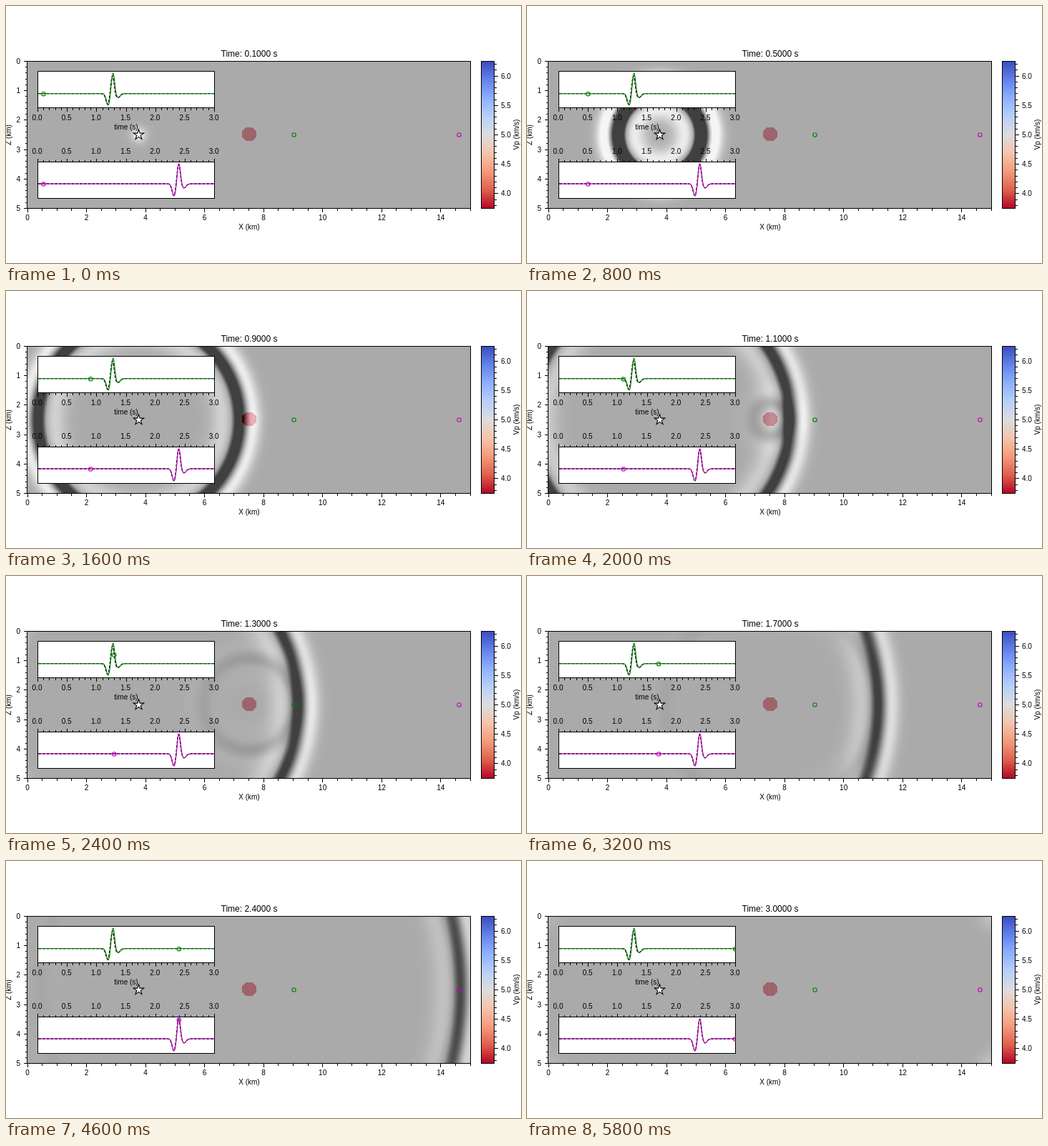
An HTML page with a canvas that plays this animation: 720x360 px, repeating every 6000 ms.

```html
<!DOCTYPE html>
<html lang="en">
<head>
<meta charset="utf-8">
<title>Wave propagation</title>
<style>
  html, body { margin: 0; width: 100%; height: 100%; overflow: hidden; background: #fff; }
  canvas { position: absolute; left: 30px; top: 77px; }
  svg { position: absolute; left: 0; top: 0; }
  text { font: 10px "Liberation Sans", Arial, sans-serif; fill: #000; text-anchor: middle; }
  #title { font-size: 12px; }
  .axis { stroke: #000; stroke-width: 1; fill: none; shape-rendering: crispEdges; }
</style>
</head>
<body>
<canvas id="field" width="620" height="207"></canvas>
<svg id="plot" width="720" height="360" viewBox="0 0 720 360">
  <defs>
    <linearGradient id="velocity" x1="0" y1="0" x2="0" y2="1"></linearGradient>
  </defs>
  <text id="title" x="340" y="71"></text>
</svg>
<script>
const LEFT = 30, TOP = 77, W = 620, H = 207;
const KM = 619 / 15, SPEED = 5 * KM;
const SOURCE = [185.5, 180.5], BLOB = [340, 179.5];
const GREEN = '#008000', MAGENTA = '#bf00bf';
const plot = document.getElementById('plot');
const title = document.getElementById('title');

function add(tag, attrs, text) {
  const el = document.createElementNS('http://www.w3.org/2000/svg', tag);
  for (const k in attrs) el.setAttribute(k, attrs[k]);
  if (text !== undefined) el.textContent = text;
  plot.append(el);
  return el;
}
const label = (x, y, text, more) => add('text', { x, y, ...more }, text);
const vertical = (x, y, text) => label(0, 0, text, { transform: `translate(${x} ${y}) rotate(-90)` });
const box = (x, y, width, height, fill) => add('rect', { x, y, width, height, class: 'axis', style: `fill:${fill}` });
const ring = (cx, cy, color) => add('circle', { cx, cy, r: 2.7, fill: 'none', stroke: color, 'stroke-width': 1.1 });

// count + 1 ticks from (x, y), spaced by (dx, dy), pointing along (ux, uy)
function ticks(x, y, dx, dy, ux, uy, count, isMajor) {
  let d = '';
  for (let i = 0; i <= count; i++) {
    const n = isMajor(i) ? 5 : 3;
    d += `M${Math.round(x + i * dx - .5) + .5} ${Math.round(y + i * dy - .5) + .5}l${ux * n} ${uy * n}`;
  }
  add('path', { d, class: 'axis' });
}

// Main axes
box(29.5, 77.5, 620, 206, 'none');
ticks(30, 283.5, KM / 2, 0, 0, 1, 30, i => i % 4 === 0);
ticks(29.5, 77.5, 0, 206 / 25, -1, 0, 25, i => i % 5 === 0);
for (let x = 0; x <= 14; x += 2) label(30 + x * KM, 300, x);
for (let z = 0; z <= 5; z++) label(20, 81 + z * 41.2, z, { style: 'text-anchor:end' });
label(340, 313, 'X (km)');
vertical(7, 180.5, 'Z (km)');

// Colour bar
const stops = ['59,76,192', '98,130,234', '141,176,254', '184,208,249', '221,221,221',
  '245,196,173', '244,154,123', '222,96,77', '180,4,38'];
document.getElementById('velocity').innerHTML =
  stops.map((c, i) => `<stop offset="${i / 8}" stop-color="rgb(${c})"/>`).join('');
box(664.5, 77.5, 18, 206, 'url(#velocity)');
ticks(682.5, 81.6, 0, 8.24, 1, 0, 24, i => i % 5 === 2);
for (let i = 0; i < 5; i++) label(692, 101.5 + i * 41.2, (6 - i / 2).toFixed(1), { style: 'text-anchor:start' });
vertical(717, 180, 'Vp (km/s)');

// Source and receivers
const points = Array.from({ length: 10 }, (_, i) => {
  const r = i % 2 ? 2.9 : 7.6, a = (i / 5 - .5) * Math.PI;
  return `${SOURCE[0] + r * Math.cos(a)},${SOURCE[1] + r * Math.sin(a)}`;
});
add('polygon', { points: points.join(' '), fill: '#fff', stroke: '#000', 'stroke-width': 1.1 });
ring(402.5, 180.5, GREEN);
ring(633.5, 180.5, MAGENTA);

// Seismogram insets
const bump = (x, c, w) => Math.exp(-(((x - c) / w) ** 2) / 2);
const wavelet = (base, c, dip, peak) => x =>
  base + dip * bump(x, c - 6.5, 2.6) - peak * bump(x, c, 2.3) + 6 * bump(x, c + 7, 3.2);

function inset(y, tickY, dir, labelY, color, solid, dashed) {
  box(44.5, y, 247, 51, '#fff');
  ticks(44.5, tickY, 247 / 30, 0, 0, dir, 30, i => i % 5 === 0);
  for (let i = 0; i <= 6; i++) label(43.5 + i * 41.2, labelY, (i / 2).toFixed(1));
  const trace = (f, attrs) => {
    let d = '';
    for (let x = 45; x <= 291; x += .5) d += `${d ? 'L' : 'M'}${x} ${f(x).toFixed(2)}`;
    add('path', { d, fill: 'none', ...attrs });
  };
  trace(dashed, { stroke: '#000', 'stroke-width': 1.3, 'stroke-dasharray': '4 1.8' });
  trace(solid, { stroke: color, 'stroke-width': 1.1 });
  const marker = ring(0, 0, color);
  marker.setAttribute('clip-path', 'url(#insets)');
  return t => {
    const x = 44.2 + t * 82.33;
    marker.setAttribute('cx', x);
    marker.setAttribute('cy', dashed(x) + .5);
  };
}
plot.querySelector('defs').insertAdjacentHTML('beforeend',
  '<clipPath id="insets"><rect x="44" y="91" width="248" height="179"/></clipPath>');
const markers = [
  inset(91.5, 142.5, 1, 159.5, GREEN,
    wavelet(122.7, 149.6, 16.5, 30), wavelet(122.7, 148.8, 15.5, 26)),
  inset(218.5, 218.5, -1, 206.5, MAGENTA,
    wavelet(249, 241.7, 17.5, 29.5), wavelet(249, 241.3, 17, 28.5))
];
label(168, 172.5, 'time (s)');

// Wave field: direct pulse plus the weaker one scattered by the slow body
const ctx = document.getElementById('field').getContext('2d');
const image = ctx.createImageData(W, H);
const WIDTH = 11.5;

function pulse(d) {
  let gain = -1;
  if (d < -WIDTH) {
    d = (d + WIDTH) * .7 - WIDTH;
    gain = -.5;
  }
  const q = (d / WIDTH) ** 2;
  return q > 30 ? 0 : gain * (1 - q) * Math.exp(-q / 2);
}

function drawField(t) {
  const front = SPEED * t - 45, scatter = SPEED * t - 204;
  const late = Math.max(0, Math.min(1, (t - 2.5) / .3));
  for (let j = 0, k = 0; j < H; j++) {
    for (let i = 0; i < W; i++, k += 4) {
      const x = LEFT + i + .5, y = TOP + j + .5;
      const r = Math.hypot(x - SOURCE[0], y - SOURCE[1]);
      const bx = x - BLOB[0], by = y - BLOB[1], s = Math.hypot(bx, by);
      let v = 95 * Math.sqrt(387 / Math.max(r, 40)) * pulse(r - front);
      if (scatter > -50)
        v += 22 * Math.sqrt(65 / Math.max(s, 25)) * (.75 + .4 * bx / (s + 1)) * pulse(s - scatter);
      if (late) {
        const c = Math.hypot(Math.min(i, W - i), Math.min(j, H - j));
        v += late * (i > W / 2 ? 24 : 10) * Math.exp(-((c / 18) ** 2));
      }
      v = 170 + Math.max(-106, Math.min(75, v));
      const ax = Math.abs(bx), ay = Math.abs(by);
      const body = ax < 9.6 && ay < 9.6 && ax + ay < 14 ? 1 : 0;
      image.data[k] = v - 12 * body;
      image.data[k + 1] = v - 70 * body;
      image.data[k + 2] = v - 62 * body;
      image.data[k + 3] = 255;
    }
  }
  ctx.putImageData(image, 0, 0);
}

const start = performance.now();
let shown = -1;
function tick() {
  const step = Math.floor((performance.now() - start) % 6000 / 200);
  if (step !== shown) {
    shown = step;
    const t = (step + 1) / 10;
    title.textContent = `Time: ${t.toFixed(4)} s`;
    markers.forEach(move => move(t));
    drawField(t);
  }
  requestAnimationFrame(tick);
}
tick();
</script>
</body>
</html>
```
